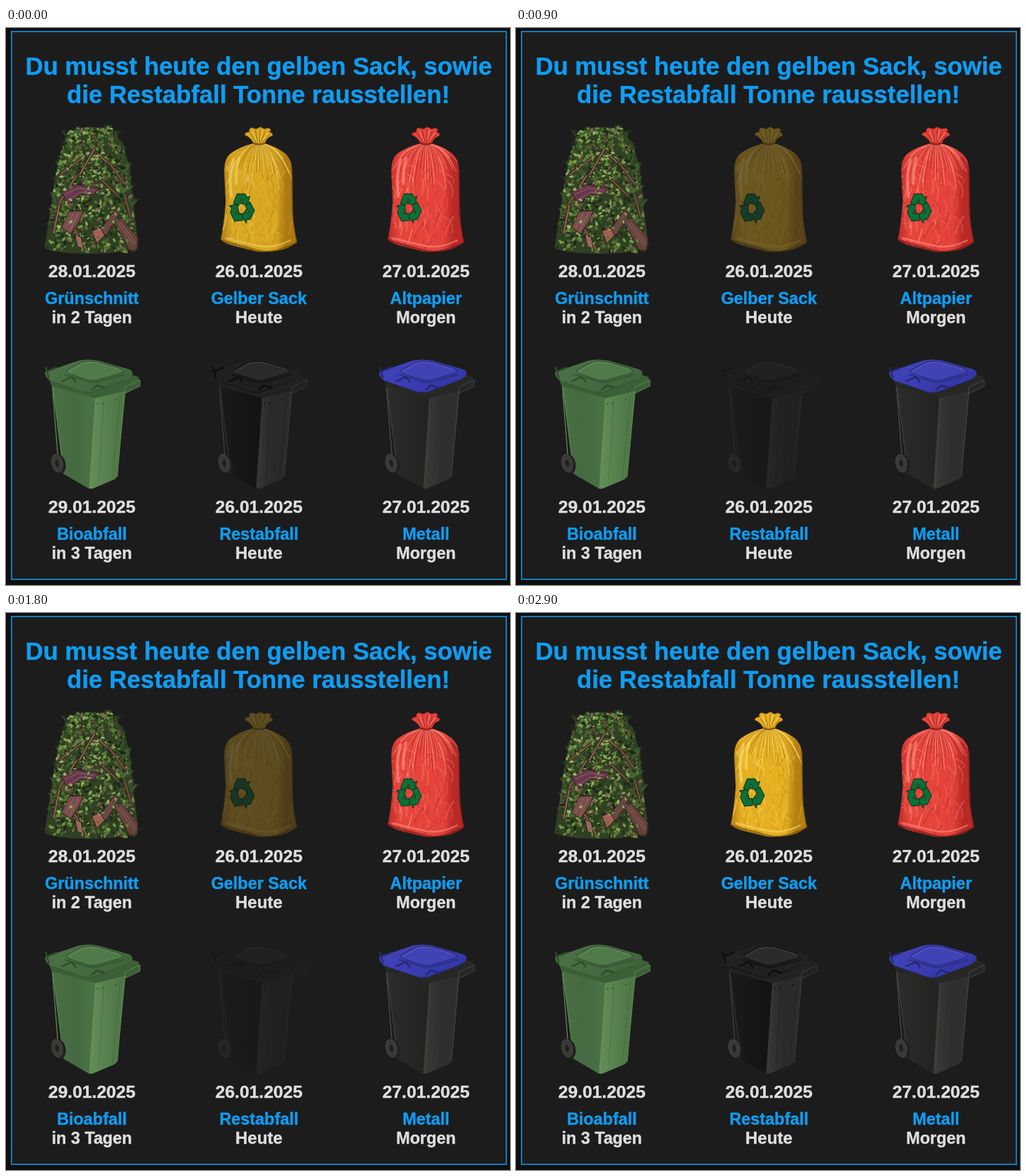
Recreate the animation shown at these times as an HTML page. Size 712 by 787 pixels, loop 3000 ms.

```html
<!DOCTYPE html>
<html lang="de">
<head>
<meta charset="utf-8">
<title>Abfallkalender</title>
<style>
html, body { margin: 0; width: 100%; height: 100%; overflow: hidden; background: #0f0f10; }
svg { display: block; width: 712px; height: 787px; }
text { font-family: "Liberation Sans", Arial, sans-serif; font-weight: bold; text-anchor: middle;
  stroke-width: .4; stroke-linejoin: round; }
.blue { fill: #0f9df3; stroke: #0f9df3; }
.white { fill: #dedede; stroke: #dedede; }
</style>
</head>
<body>
<svg id="stage" viewBox="0 0 712 787"></svg>
<script>
const stage = document.getElementById('stage');
const LOOP = 3000, STEP = 100, LOW = 1400;

let seed = 7;
function rnd(a = 0, b = 1) {
  seed = (seed * 16807) % 2147483647;
  return a + (b - a) * seed / 2147483647;
}
const pick = list => list[Math.floor(rnd() * list.length)];
const n = v => v.toFixed(1);

const path = (d, fill, extra = '') => `<path d="${d}" fill="${fill}" ${extra}/>`;
const line = (d, color, width = 1, alpha = 1) =>
  path(d, 'none', `stroke="${color}" stroke-width="${width}" stroke-opacity="${alpha}" stroke-linecap="round" stroke-linejoin="round"`);
const text = (x, y, size, cls, s) => `<text x="${x}" y="${y}" font-size="${size}" class="${cls}">${s}</text>`;
function gradient(id, colors, dir = 'x2="1" y2="0"') {
  const stops = colors.map((c, i) => `<stop offset="${i / (colors.length - 1)}" stop-color="${c}"/>`).join('');
  return `<linearGradient id="${id}" ${dir}>${stops}</linearGradient>`;
}

// Heap of garden waste, centred on x = 0
function heap() {
  const half = u => 26 + 40 * Math.sqrt(u);
  const greens = ['#26381a', '#34501f', '#48682c', '#5c7b36', '#6d8f45', '#2a4420', '#1d2618', '#86a455', '#4a6335', '#5d4a35', '#7b6650', '#222a1a'];
  const leaf = (u, spread, r, colors) =>
    path(`M${n(-r)} 0Q0 ${n(-r)} ${n(r)} 0Q0 ${n(r)} ${n(-r)} 0`, pick(colors),
      `transform="translate(${n(half(u) * rnd(-spread, spread))} ${n(142 + 174 * u)}) rotate(${n(rnd(0, 360))})"`);
  let s = path('M-26 144Q0 134 26 146L44 162 54 200 60 262 66 306Q50 319 0 319Q-50 319 -67 311L-59 260 -50 200 -39 160Z', '#2f4023');
  for (let i = 0; i < 110; i++) {
    const u = rnd(0, .7), side = rnd() < .4 ? -1 : 1;
    const x = side * half(u) * rnd(.6, .95), y = 149 + 170 * u;
    const dx = side * rnd(1, 9), dy = -rnd(5, 12);
    let d = '';
    for (let k = .2; k <= 1; k += .2) {
      const px = x + dx * k, py = y + dy * k;
      d += `M${n(px - 2.5)} ${n(py - 2)}L${n(px)} ${n(py)}L${n(px + 2.5)} ${n(py - 2)}`;
    }
    s += line(`M${n(x)} ${n(y)}l${n(dx)} ${n(dy)}` + d, pick(['#38542b', '#466536', '#2a4020']), .9);
  }
  for (let i = 0; i < 950; i++) s += leaf(rnd(), .98, rnd(1.5, 4.6), greens);
  const sticks = ['M4 170L-17 207', 'M-9 180L-45 207', 'M8 178L36 202', 'M24 190L47 221', 'M-22 209L-48 250',
    'M30 262L8 292', 'M-46 250L-54 290', 'M46 235L55 268', 'M-24 285L-8 313', 'M14 215L35 235'];
  sticks.forEach((d, i) => {
    s += line(d, '#35251d', 4.4) + line(d, i % 2 ? '#755443' : '#8a6350', 2.2);
  });
  const planks = [
    ['M-43 231L-22 221 10 226 3 236 -16 235 -34 249Z', '#66384a'],
    ['M-32 259L-12 258 -18 273 -30 291 -43 282Z', '#794d4b'],
    ['M32 257L39 262 20 293 10 288Z', '#694844'],
    ['M32 276L41 268 65 296 64 313 53 314Z', '#65423c'],
    ['M0 287L12 282 18 293 7 304Z', '#a45f54'],
    ['M-24 291L-15 296 -12 312 -20 309Z', '#9b6863']
  ];
  planks.forEach(([d, c]) => s += path(d, c, 'stroke="#2c1f1b" stroke-width="1"'));
  s += line('M-38 235L-18 226 3 230M-34 243L-16 232 0 234M-26 262L-37 282M-19 262L-31 286M36 274L60 307M41 275L62 304', '#a37878', 1, .7);
  for (let i = 0; i < 130; i++) s += leaf(rnd(), .85, rnd(1.5, 4), ['#7d9d48', '#9bb565', '#5d8137', '#4f742d']);
  return s;
}

// Tied plastic sack, centred on x = 0
const BODY = 'M-8 163Q-28 168 -41 178Q-50 186 -49 206L-47 245Q-49 275 -54 299Q-48 305 -31 309L-2 316Q25 317 40 311L54 303Q49 282 48 262L47 200Q46 185 37 177Q23 167 8 163Z';
const RUFFLE = 'M-7 163Q-13 153 -20 151Q-19 147 -13 147Q-15 142 -10 141L-4 143 2 140 8 143Q14 140 17 144L14 147Q20 148 19 152Q11 154 8 163Z';
function sack(id, [light, mid, dark, deep]) {
  let folds = '';
  for (let i = 0; i < 44; i++) {
    const t = i / 43 * 2 - 1, x = t * 47, y = 186 + rnd(0, 38) - t * t * 9;
    folds += line(`M${n(t * 6)} 164Q${n(t * 30)} 168 ${n(x)} ${n(y)}`, i % 2 ? light : dark, rnd(.5, 1.6), .65);
  }
  for (let i = 0; i < 120; i++) {
    const x = rnd(-50, 46), y = rnd(190, 308), w = rnd(-12, 12), h = rnd(6, 26);
    const lit = rnd(-50, 46) > x;
    folds += line(`M${n(x)} ${n(y)}q${n(w + 4)} ${n(h * .4)} ${n(w)} ${n(h)}`, lit ? light : dark, rnd(.6, 1.8), rnd(.2, .55));
  }
  const arm = path('M-14 -7L-8 -19 5 -19 9 -14 13 -16 9 -4 -3 -7 1 -9 -1 -12 -6 -3Z', '#0d7037', 'stroke="#123d20" stroke-width="1.3" stroke-linejoin="round"');
  const arms = [0, 120, 240].map(a => `<g transform="rotate(${a})">${arm}</g>`).join('');
  return `<defs>${gradient(id, [dark, mid, mid, mid, mid, mid, dark, dark])}<clipPath id="${id}c"><path d="${BODY}"/></clipPath></defs>`
    + path(BODY, `url(#${id})`)
    + `<g clip-path="url(#${id}c)">${folds}`
    + line('M-46 297Q-20 304 0 308T44 300', light, 2.5, .55)
    + line('M-54 301Q-20 311 0 316T54 304', deep, 5, .6)
    + line('M48 190L49 260 55 304', deep, 6, .45)
    + line('M-50 200L-48 245 -55 300', deep, 3, .4)
    + line('M-36 186Q-43 210 -39 238M-28 184Q-33 200 -32 220', light, 4, .6)
    + line('M18 183Q27 200 28 228', light, 2, .45) + '</g>'
    + path(RUFFLE, mid, `stroke="${dark}" stroke-width=".8"`)
    + line('M-4 162L-12 149M-2 161L-5 145M1 161L2 143M3 161L9 146M5 162L15 150', deep, 1, .6)
    + line('M-3 160L-9 146M2 158L5 144M4 160L14 147', light, 1, .9)
    + line('M-7 163Q0 166 8 163', deep, 2.2, .8)
    + `<g transform="translate(-24 255) scale(.86 1.08)">${arms}</g>`;
}

// Two-wheeled bin, centred on x = 0
function bin(id, c) {
  return `<defs>${gradient(id + 'l', c.left)}${gradient(id + 'r', c.right)}${gradient(id + 't', c.lid, 'x2="1" y2=".6"')}</defs>`
    + line('M-56 505L-48 606', c.edge, 1.2)
    + path('M-57 499L6 517 0 648Q-1 651 -4 651L-40 630Z', `url(#${id}l)`)
    + path('M5 517L48 509 46 530 36 632Q35 637 29 639L3 650Q-1 652 -4 650Z', `url(#${id}r)`)
    + line('M-55 508L-40 628M46 516L36 634', c.edge, 1, .7)
    + line('M6 522L-1 648', c.edge, 1.3, .45)
    + line('M17 524L10 638M40 520L29 636', c.shade, 1, .3)
    + path('M-61 494L4 510 56 490 66 493 68 506 42 514 5 523 -57 506Z', c.rim)
    + path('M46 508L68 497 68 506 47 516Z', c.rim, `stroke="${c.edge}" stroke-width=".8"`)
    + path('M-66 486L-19 470Q-6 467 9 470L52 482Q59 485 57 490Q55 494 46 498L6 513Q-5 517 -16 513L-54 500Q-64 497 -66 489Z', `url(#${id}t)`)
    + line('M-54 500L-16 513Q-5 517 6 513L46 498', c.shade, 1.3, .6)
    + path('M-35 483L-14 472Q-4 469 8 472L40 481Q47 485 40 488L8 497Q2 499 -6 497L-34 488Z', c.panel, `stroke="${c.shade}" stroke-width="1"`)
    + line('M-34 486L-14 474Q-4 471 7 473L38 482', c.shine, 1, .6)
    + line('M-38 490L-7 499Q2 502 11 499L45 490', c.shade, 2, .6)
    + line('M-42 499L-28 493 -23 500M0 511L7 505 17 508', c.shade, 2.4)
    + line('M-65 480L-61 494M-63 485L-50 480', c.shade, 2.5)
    + [[8, 531], [15, 530], [34, 525]].map(([x, y]) => `<circle cx="${x}" cy="${y}" r="1" fill="${c.shade}"/>`).join('')
    + `<ellipse cx="-46" cy="616" rx="9" ry="14" transform="rotate(-12 -46 616)" fill="${c.tyre}"/>`
    + `<ellipse cx="-49" cy="615" rx="7.5" ry="12.5" transform="rotate(-12 -49 615)" fill="${c.wheel}" stroke="${c.hub}" stroke-width="1"/>`
    + `<ellipse cx="-49" cy="615" rx="3.4" ry="6" transform="rotate(-12 -49 615)" fill="${c.tyre}" stroke="${c.hub}" stroke-width=".8"/>`;
}

const yellow = ['#ffe070', '#e6b022', '#b57f12', '#6f4a08'];
const red = ['#ff9688', '#e5443b', '#b92a26', '#741414'];
const wheels = { tyre: '#20201f', wheel: '#383837', hub: '#4a4a48' };
const green = { ...wheels, left: ['#4b6f45', '#456940', '#4c7346'], right: ['#648f58', '#577f4d', '#4d7445'],
  lid: ['#4b7145', '#486d43', '#3f633b'], panel: '#517a4a', rim: '#3c5f37', edge: '#66905a', shade: '#2f4b2c', shine: '#7d9f75' };
const black = { ...wheels, left: ['#1b1b1b', '#161616', '#131313'], right: ['#383836', '#2a2a29', '#2d2d2c'],
  lid: ['#242424', '#1f1f1f', '#222222'], panel: '#2b2b2b', rim: '#222221', edge: '#434341', shade: '#0d0d0d', shine: '#5a5a58' };
const metal = { ...black, left: ['#2c2c2b', '#272726', '#222221'], right: ['#3a3a37', '#2e2e2c', '#2f2f2d'],
  lid: ['#4446b9', '#3b3eb2', '#3336a4'], panel: '#4143b4', rim: '#272726', edge: '#50504d', shade: '#25276f', shine: '#6f72d4' };

const items = [
  { art: heap(), date: '28.01.2025', name: 'Grünschnitt', day: 'in 2 Tagen' },
  { art: sack('y', yellow), date: '26.01.2025', name: 'Gelber Sack', day: 'Heute' },
  { art: sack('r', red), date: '27.01.2025', name: 'Altpapier', day: 'Morgen' },
  { art: bin('g', green), date: '29.01.2025', name: 'Bioabfall', day: 'in 3 Tagen' },
  { art: bin('k', black), date: '26.01.2025', name: 'Restabfall', day: 'Heute' },
  { art: bin('m', metal), date: '27.01.2025', name: 'Metall', day: 'Morgen' }
];

stage.innerHTML = '<rect width="712" height="787" fill="#0f0f10"/>'
  + '<rect x="7.8" y="5" width="699" height="774" fill="#1c1c1c" stroke="#1488cc" stroke-width="1.8"/>'
  + text(357, 66, 34.7, 'blue', 'Du musst heute den gelben Sack, sowie')
  + text(356.5, 106, 34.7, 'blue', 'die Restabfall Tonne rausstellen!')
  + items.map((it, i) => {
    const x = 121.3 + 236 * (i % 3), y = i < 3 ? 0 : 332.5;
    const due = it.day === 'Heute';
    return `<g transform="translate(${x} 0)"${due ? ' class="due"' : ''}>${it.art}</g>`
      + text(x, 352 + y, 24.6, 'white', it.date)
      + text(x, 390 + y, 23.4, 'blue', it.name)
      + text(x, 417 + y, due ? 24 : 23.3, 'white', it.day);
  }).join('');

const due = document.querySelectorAll('.due');
function draw(ms) {
  const t = Math.floor(ms % LOOP / STEP) * STEP;
  const gap = Math.abs(t - LOW) / (LOOP / 2);
  const alpha = Math.pow(gap, .85);
  due.forEach(g => g.setAttribute('opacity', alpha.toFixed(3)));
}

let start;
function tick(now) {
  start ??= now;
  draw(Math.max(0, now - start));
  requestAnimationFrame(tick);
}
draw(0);
requestAnimationFrame(tick);
</script>
</body>
</html>
```
